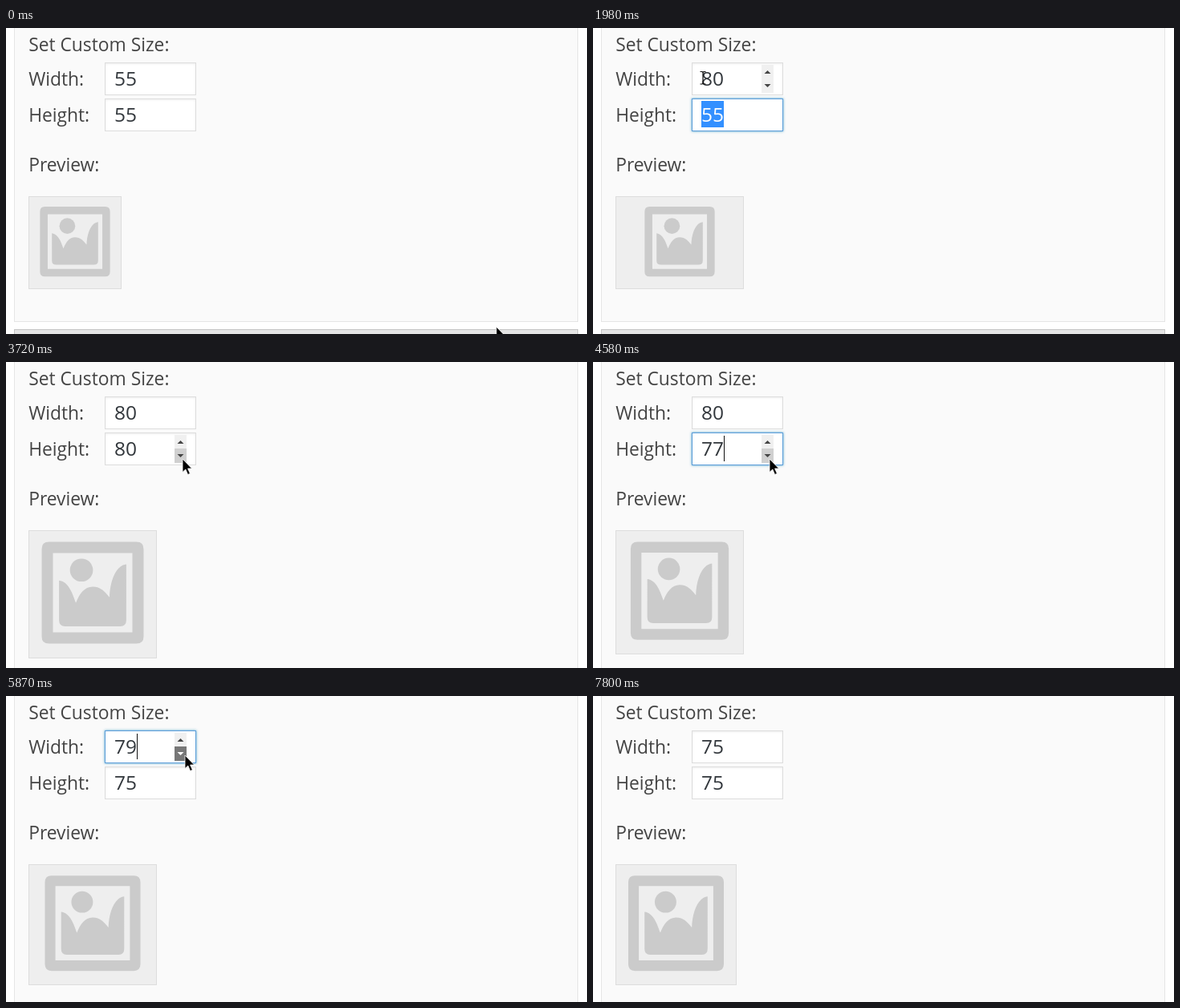
These frames come from a looping animation (724x382 px, 7880 ms). An HTML page:

```html
<!DOCTYPE html>
<html lang="en">
<head>
<meta charset="utf-8">
<title>Custom size preview</title>
<style>
  html, body { margin: 0; width: 724px; height: 382px; overflow: hidden; background: #fff; }
  body { position: relative; }
  #panel, #bar, .field, svg { position: absolute; box-sizing: border-box; }
  #panel { left: 10px; top: -10px; width: 703px; background: #fafafa; border: 1px solid #e5e5e5; }
  #bar { left: 10px; width: 703px; height: 60px; background: #e5e5e5; border: 1px solid #c4c4c4; }
  .field {
    left: 123px; width: 114px; height: 41px; background: #fff;
    border: 1px solid #ddd; box-shadow: inset 0 1px 3px rgba(0, 0, 0, .07);
  }
  .field.fading { border-color: #7fb0de; }
  .field.focus { border-color: #5b9dd9; box-shadow: 0 0 3px rgba(30, 140, 190, .8); }
  svg { left: 0; top: 0; }
  text { font-family: "Open Sans", "Noto Sans", sans-serif; white-space: pre; }
  .label { font-size: 22.8px; fill: #444; }
  .value { font-size: 24.5px; fill: #32373c; }
</style>
</head>
<body>
<div id="panel"></div>
<div id="bar"></div>
<div class="field" style="top:43px"></div>
<div class="field" style="top:88px"></div>
<svg width="724" height="382" viewBox="0 0 724 382">
  <g class="label">
    <text x="28.2" y="29">Set Custom Size:</text>
    <text x="28.2" y="72">Width:</text>
    <text x="28.2" y="117">Height:</text>
    <text x="28.2" y="179">Preview:</text>
  </g>

  <rect id="box" x="28.5" y="210.5" fill="#eee" stroke="#ddd"/>
  <g id="icon" fill="#cbcbcb">
    <path fill-rule="evenodd" d="M7 0H93Q100 0 100 7V93Q100 100 93 100H7Q0 100 0 93V7Q0 0 7 0ZM11 11V89H89V11Z"/>
    <circle cx="39" cy="27.7" r="11.3"/>
    <path d="M17 38C26 39 30 50 33.5 60C37 51 42 44 50 44C58 44 62 49 66.5 54.5C67 38 73 23 83 22V77Q83 83 77 83H23Q17 83 17 77Z"/>
  </g>

  <g id="rows"></g>

  <path id="arrow" d="M0 0V16.5L3.8 13L6.6 19.5L9.4 18.3L6.6 12H11.6Z" stroke="#fff" stroke-width=".8"/>
  <path id="beam" d="M-3.5 -7.5H-1L0 -6.5L1 -7.5H3.5M0 -6.5V7M-3.5 8H-1L0 7L1 8H3.5" fill="none" stroke="#111" stroke-width="1.2"/>
</svg>
<script>
const LOOP = 7880, TICK = 75, HOLD = 140;
const $ = id => document.getElementById(id);
const fields = [...document.querySelectorAll('.field')];

function set(el, attrs) {
  for (const k in attrs) el.setAttribute(k, attrs[k]);
  return el;
}
function add(parent, tag, attrs) {
  const el = document.createElementNS('http://www.w3.org/2000/svg', tag);
  return parent.appendChild(set(el, attrs));
}
const show = (el, on) => { el.style.display = on ? '' : 'none'; };

// Selection, value, caret and spinner of one input
const rows = [43, 88].map(top => {
  const g = $('rows');
  const mark = add(g, 'rect', { x: 135, y: top + 3, width: 28, height: 33, fill: '#3390ff' });
  const value = add(g, 'text', { class: 'value', x: 135, y: top + 29 });
  const caret = add(g, 'rect', { y: top + 4, width: 1, height: 32, fill: '#111' });
  const spin = add(g, 'g', { transform: `translate(210 ${top + 3})` });
  const halves = [0, 17].map(y => add(spin, 'rect', { y, width: 15, height: 18 }));
  const tips = ['M3.5 11H11.5L7.5 7Z', 'M3.5 24H11.5L7.5 28Z'].map(d => add(spin, 'path', { d }));
  return { top, mark, value, caret, spin, halves, tips };
});

// Form state: typed values, preview size, and row numbers for focus and selection
const start = { val0: 55, val1: 55, size0: 55, size1: 55, focus: -1, fading: -1, sel: -1, press: false };
const events = [];
const at = (time, change) => events.push({ time, change });

function type(row, time, text, gap) {
  [...text].forEach((_, i) => at(time + i * gap, { ['val' + row]: text.slice(0, i + 1), sel: -1 }));
  at(time + text.length * gap, { ['size' + row]: +text });
}
// Spinner clicks from 79 to 75: the value drops first, the preview follows
function spinDown(row, from, to, power) {
  for (let i = 0; i < 5; i++) {
    const time = from + (to - from) * (i / 4) ** power;
    at(time, { ['val' + row]: 79 - i, focus: row, press: true });
    at(time + HOLD, { ['size' + row]: 79 - i, press: false });
  }
}
at(680, { focus: 0 });
at(840, { sel: 0 });
type(0, 1730, '80', 125);
at(1980, { focus: 1, sel: 1 });
type(1, 2210, '80', 75);
at(2730, { focus: -1, fading: 1 });
at(2806, { fading: -1 });
spinDown(1, 3950, 4930, 1);
spinDown(0, 5870, 6830, 1.25);
at(7610, { focus: -1 });
events.sort((a, b) => a.time - b.time);

// Pointer strokes: start, end, from, bend, to
const strokes = [
  [70, 640, [301, 179], [200, 85], [163, 63]],
  [760, 1200, [163, 63], [125, 72], [137, 62]],
  [2740, 3340, [137, 62], [330, 100], [226, 120]],
  [3420, 3720, [226, 120], [223, 121], [220, 121]],
  [5130, 5560, [220, 121], [221, 100], [223, 74]],
  [7060, 7780, [223, 74], [380, 230], [603, 375]],
];
function pointer(t) {
  if (t < 70) return [611, 373];
  if (t >= 7800) return null;
  const [t0, t1, a, b, c] = strokes.filter(s => s[0] <= t).pop();
  const p = Math.min(1, Math.floor((t - t0) / TICK) * TICK / (t1 - t0 - TICK));
  const e = p * p * (3 - 2 * p), q = 1 - e;
  return a.map((v, i) => Math.round(q * q * v + 2 * q * e * b[i] + e * e * c[i]));
}

// Returns whether the pointer is over the text part of the input
function drawRow(r, i, s, [x, y]) {
  const hover = x >= 123 && x < 237 && y >= r.top && y < r.top + 41;
  const focus = s.focus === i, sel = s.sel === i, text = String(s['val' + i]);
  fields[i].className = 'field' + (focus ? ' focus' : s.fading === i ? ' fading' : '');
  r.value.textContent = text;
  r.value.style.fill = sel ? '#fff' : '';
  show(r.mark, sel);
  show(r.caret, focus && !sel);
  set(r.caret, { x: 135 + 14 * text.length });
  show(r.spin, hover);
  r.halves.forEach((half, k) => {
    const over = hover && x >= 210 && x <= 225 && (y >= r.top + 20) === (k === 1);
    const down = over && s.press;
    set(half, { fill: down ? '#777' : over ? '#d0d0d0' : '#f0f0f0' });
    set(r.tips[k], { fill: down ? '#fff' : '#444' });
  });
  return hover && x < 210;
}

function draw(t) {
  const past = events.filter(e => e.time <= t).map(e => e.change);
  const s = Object.assign({}, start, ...past);
  const pos = pointer(t);

  const side = n => Math.round(n * 1.757 + 19.4);
  const w = side(s.size0), h = side(s.size1), icon = s.size1 * 1.587;
  set($('box'), { width: w - 1, height: h - 1 });
  set($('icon'), {
    transform: `translate(${28 + w / 2 - icon / 2} ${210 + h * .488 - icon / 2}) scale(${icon / 100})`
  });
  $('panel').style.height = 261 + h + 'px';
  $('bar').style.top = 260 + h + 'px';

  const inText = rows.map((r, i) => drawRow(r, i, s, pos || [-1, -1])).some(Boolean);
  show($('arrow'), pos && !inText);
  show($('beam'), pos && inText);
  if (pos) set(inText ? $('beam') : $('arrow'), { transform: `translate(${pos})` });
}

const begin = performance.now();
function tick() {
  draw((performance.now() - begin) % LOOP);
  requestAnimationFrame(tick);
}
tick();
</script>
</body>
</html>
```
